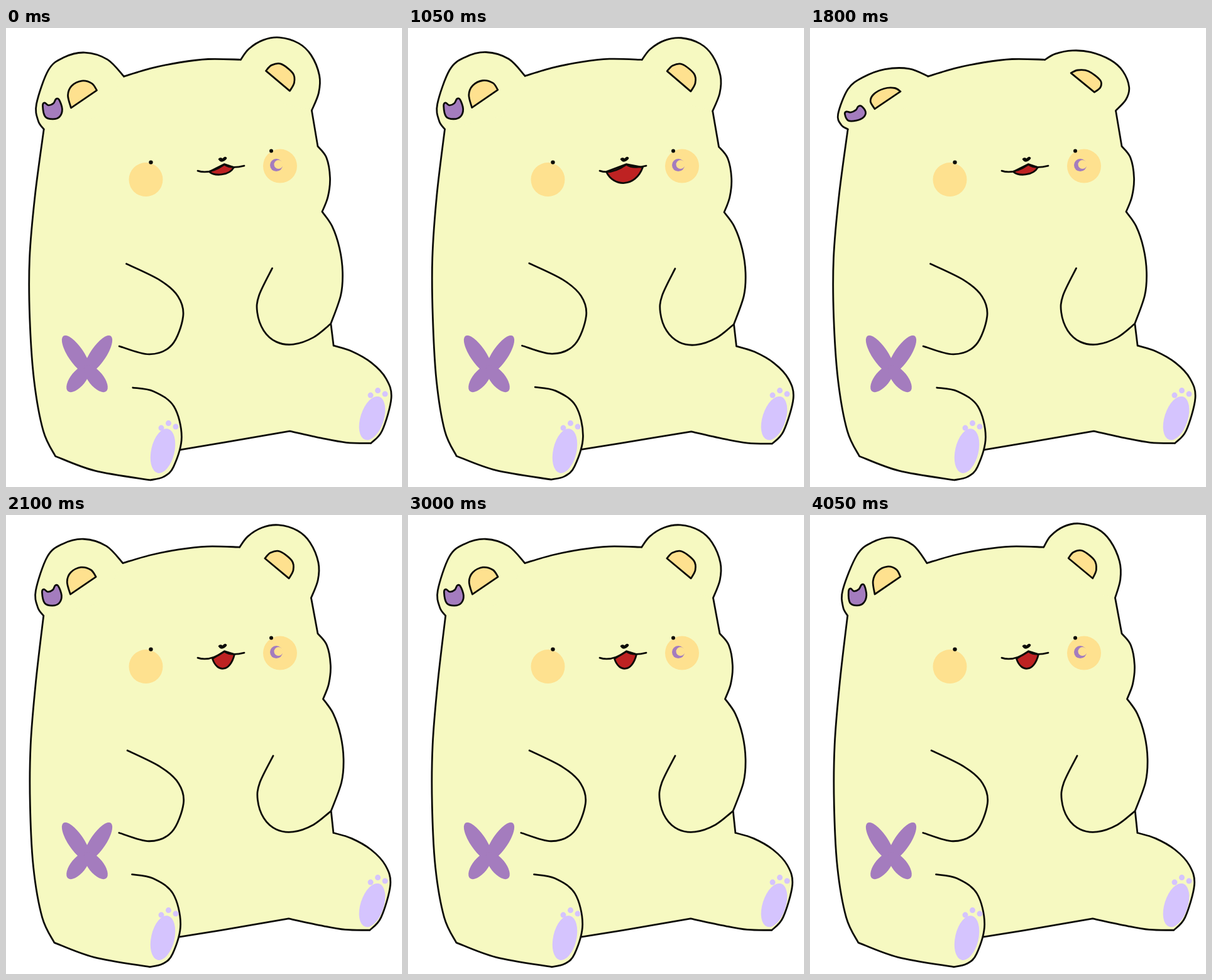
Animation of 630 by 730 pixels, one loop 4200 ms. Source, as an HTML page:

```html
<!DOCTYPE html>
<html lang="en">
<head>
<meta charset="utf-8">
<title>Bear</title>
<style>
html, body { margin: 0; width: 100%; height: 100%; overflow: hidden; background: #fff; }
svg { display: block; width: 630px; height: 730px; }
.skin { fill: #f6f9c1; }
.line { fill: none; stroke: #0c0c08; stroke-width: 2.8; stroke-linecap: round; stroke-linejoin: round; vector-effect: non-scaling-stroke; }
.ink { fill: #0c0c08; }
.blush { fill: #fee18f; }
.plum { fill: #a47cbe; }
.lilac { fill: #d5c4fe; }
.red { fill: #be2222; }
</style>
</head>
<body>
<svg id="stage" viewBox="0 0 630 730"></svg>
<script>
const STEP = 150, STEPS = 28, POSES = 3;
let pose = 0;

// Hand-drawn boil: each pose nudges the key points along a slow wave
const phase = () => pose * 2 * Math.PI / POSES;
const wobble = ([x, y]) => [
  x + Math.sin(phase() + (y - 440) / 97 - 1.05),
  y + 0.5 * Math.sin(phase() + x / 97)
];

// Smooth curve through key points given as "x,y x,y ..."
function curve(text, join = 'M', closed = false) {
  const p = text.split(' ').map(s => wobble(s.split(',').map(Number)));
  const n = p.length;
  const at = i => closed ? p[(i + n) % n] : p[Math.max(0, Math.min(n - 1, i))];
  let d = join + p[0];
  for (let i = 0; i < (closed ? n : n - 1); i++) {
    const [a, b, c, e] = [at(i - 1), at(i), at(i + 1), at(i + 2)];
    const c1 = b.map((v, k) => v + (c[k] - a[k]) / 6);
    const c2 = c.map((v, k) => v - (e[k] - b[k]) / 6);
    d += `C${c1} ${c2} ${c}`;
  }
  return d;
}
const path = (d, cls) => `<path d="${d}" class="${cls}"/>`;
const shape = (d, cls) => path(d, cls) + path(d, 'line');
const oval = (cls, x, y, rx, ry = rx, turn = 0) =>
  `<ellipse class="${cls}" cx="${x}" cy="${y}" rx="${rx}" ry="${ry}" transform="rotate(${turn} ${x} ${y})"/>`;

// Clockwise runs that meet at corners
const outline = [
  '186,76 230,63 275,54 320,49 372,50',
  '485,131 495,188',
  '495,188 509,206 515,238 512,268 503,292',
  '503,292 519,315 531,350 536,388 533,425 517,470',
  '517,470 521,505',
  '521,505 550,514 581,532 604,557 612,588 597,640 579,660',
  '579,660 540,659 500,652 450,641',
  '450,641 350,658 277,670',
  '201,571 234,577 266,601 278,650 265,697 249,713 228,718',
  '228,718 140,703 77,680',
  '77,680 58,640 44,560 38,460 38,365 46,265 59,160'
];
const arms = [
  '192,374 245,400 274,426 282,458 264,503 228,518 180,505',
  '517,470 489,492 457,503 430,499 410,481 400,452 403,425 424,382'
];

// Each ear stands on the chord y = rise + slope * x
const ears = [
  {
    slope: -0.667, rise: 200, root: '150 140',
    rim: '59,160 50,147 47,120 66,66 90,46 124,38 160,49 186,76',
    inner: '143,98 135,87 119,83 103,91 97,106 102,126',
    pin: '57,123 60,118 66,122 74,119 78,112 83,113 88,128 84,140 73,144 61,140',
    squash: [-0.08, 0.34], perk: [0.1, -0.03]
  },
  {
    slope: 0.715, rise: -216, root: '440 120',
    rim: '372,50 385,33 408,19 434,15 464,24 484,43 497,75 496,103 485,131',
    inner: '412,68 421,59 436,57 455,72 457,87 450,100',
    squash: [0.14, 0.29], perk: [-0.07, -0.03]
  }
];

// Moves points in proportion to their height above the chord
const lean = ({ slope: m, rise }, [dx, dy]) =>
  `matrix(${[1 + dx * m, dy * m, -dx, 1 - dy, dx * rise, dy * rise]})`;

const drawEar = e => '<g class="ear">' +
  path(curve(e.rim) + `L${e.root}Z`, 'skin') + path(curve(e.rim), 'line') +
  shape(curve(e.inner) + 'Z', 'blush') +
  (e.pin ? shape(curve(e.pin, 'M', true), 'plum') : '') + '</g>';

const petals = () => [-1, 1].map(s =>
  oval('plum', 128.5 + s * 17.5, 519, 36, 12.5, -s * 56) +
  oval('plum', 128.5 + s * 14, 557, 26, 12, s * 51)).join('');

// A sole with three toes above it
const paw = (x, y, turn) => oval('lilac', x, y, 18.5, 36, turn) +
  [-1, 0, 1].map(i => oval('lilac', x + 9 + i * 11.5, y - 44 + 5.5 * i * i - 2 * i * (1 - i) / 2, 4.5, 4.5)).join('');

// Mouth corners and depth for each pose
const mouths = [[323, 362, 235], [315, 373, 253], [328, 363, 250]];

function drawFace() {
  const [l, r, low] = mouths[pose], inset = (r - l) / 5;
  return oval('blush', 222, 240.5, 27) + oval('blush', 435.5, 219, 27) +
    oval('plum', 429.5, 217.5, 10) + oval('blush', 433, 216.5, 7) +
    oval('ink', 230, 213, 3.2) + oval('ink', 421.5, 195, 3) +
    path('M344 207Q340 204 337 208Q340 213 344 212Q350 210 351 206Q348 202 344 207Z', 'ink') +
    shape(`M347 216L${l} 228C${l + inset} ${low} ${r - inset} ${low} ${r} 221Z`, 'red') +
    path('M304.5 226.5Q323 233 347 216.5Q357 224 378.5 218.5', 'line');
}

function drawPose(k) {
  pose = k;
  const body = outline.map((s, i) => curve(s, i ? 'L' : 'M')).join('') + 'Z';
  const lines = [...outline, ...arms].map(s => curve(s)).join('');
  return `<g class="pose">${path(body, 'skin')}${path(lines, 'line')}${petals()}` +
    `${paw(249, 672, 13)}${paw(582, 620, 18)}${drawFace()}${ears.map(drawEar).join('')}</g>`;
}

const stage = document.getElementById('stage');
stage.innerHTML = `<g transform="translate(.5 .6)">${[0, 1, 2].map(drawPose).join('')}</g>`;
const poses = [...stage.querySelectorAll('.pose')];

function render(now) {
  const n = Math.floor(now / STEP) % STEPS;
  const current = Math.min(n, STEPS - 2) % POSES; // the last drawing is held
  const beat = n % 14;
  poses.forEach((g, i) => { g.style.display = i === current ? '' : 'none'; });
  poses[current].querySelectorAll('.ear').forEach((g, i) => {
    const e = ears[i];
    g.setAttribute('transform', lean(e, beat < 8 ? [0, 0] : beat % 2 ? e.perk : e.squash));
  });
}
const start = performance.now();
function tick() {
  render(performance.now() - start);
  requestAnimationFrame(tick);
}
tick();
</script>
</body>
</html>
```
